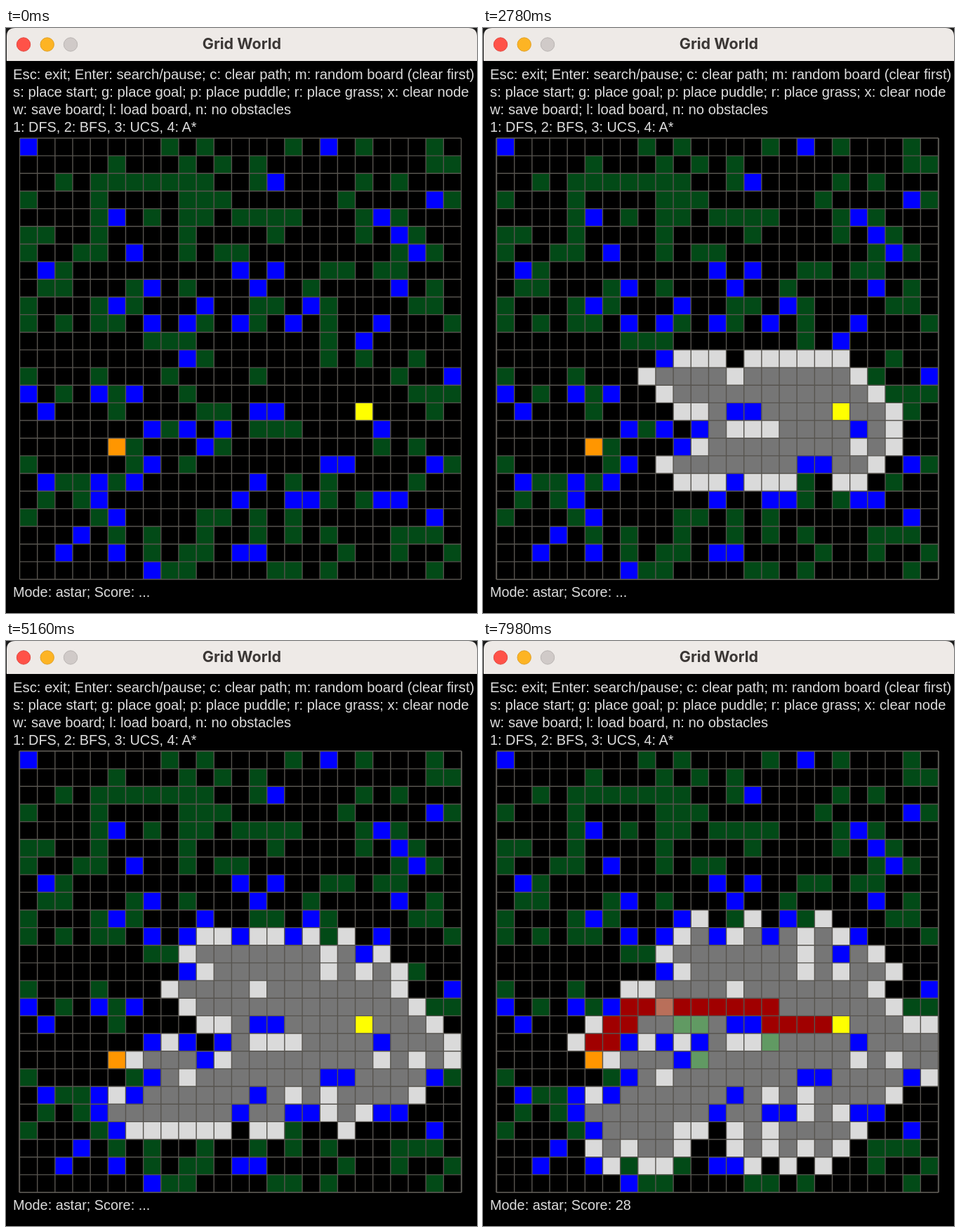
These frames come from a looping animation (671 by 834 pixels, 8000 ms). An HTML page with a canvas:

```html
<!DOCTYPE html>
<html lang="en">
<head>
<meta charset="utf-8">
<title>Grid World</title>
<style>
  html, body { margin: 0; width: 100%; height: 100%; overflow: hidden; background: #000; }
  svg, canvas { position: absolute; left: 0; top: 0; width: 671px; height: 834px; }
  .help { font: 20.25px "Liberation Sans", Arial, sans-serif; fill: #dcdcdc; }
  .status { font-size: 19.85px; }
  .title { font: 700 21.5px Inter, sans-serif; fill: #3b3735; }
</style>
</head>
<body>
<svg viewBox="0 0 671 834">
  <rect width="671" height="46" fill="#1a1a1a"/>
  <path d="M1 47V12Q1 0 13 0H659Q671 0 671 12V47Z" fill="#eeeae7"/>
  <circle cx="25" cy="23.5" r="9.7" fill="#ff5248" stroke="#e2463f"/>
  <circle cx="58.7" cy="23.5" r="9.7" fill="#fdb424" stroke="#e0a024"/>
  <circle cx="92" cy="23.5" r="9.7" fill="#d0cac8" stroke="#b9b4b2"/>
  <text class="title" x="336" y="30" text-anchor="middle">Grid World</text>
  <g class="help">
    <text x="10" y="72.5">Esc: exit; Enter: search/pause; c: clear path; m: random board (clear first)</text>
    <text x="10" y="97.5">s: place start; g: place goal; p: place puddle; r: place grass; x: clear node</text>
    <text x="10" y="122.5">w: save board; l: load board, n: no obstacles</text>
    <text class="status" x="10" y="147.5">1: DFS, 2: BFS, 3: UCS, 4: A*</text>
    <text class="status" id="status" x="10" y="810.5"></text>
  </g>
</svg>
<canvas id="board" width="671" height="834"></canvas>
<script>
// B = puddle (blocked), G = grass (costly), . = free
const MAP = `
B.......G.G....G.B.G...G.
.....G...G.G.G.........GG
..G.GGGGGGG..GB....G.G...
G...G....GGG......G....BG
....GB.G.GG.GGGG...GBG...
GG..G....G....G....G.BG..
G..GG.B..G.GG........GBG.
.BG.........B.B..GG.GG...
.GG...GB.G...B..G....B.G.
G...GBG...B..GG.BG....GG.
G.G.GG.B.BG.BG.B.G..B...G
.......GGG.......G.B.....
.........BG......G.G..G..
G...G...G....G.......G..B
B.G.BGB..G............GGG
.B...G....GG.BB........G.
.......BGB.B.GGG....B....
......G...BG........G.G..
G.....GB.G.......BB....BG
.BGGBGB......B.G.G....G..
.G.GB.......B..BBG.GBB...
G...GB....GG.G.G.......B.
...B.G.G..G..G.G.G...GGG.
..B..B.G.GG.BB....G..G..G
.......BGG....GG.G.....G.`.trim().split("\n").join("");

const N = 25, CELL = 25.16, LEFT = 19.5, TOP = 157, LOOP = 8000;
const START = 15 * N + 19, GOAL = 17 * N + 5;
const COLORS = {
  ".": "#000", B: "#0000ff", G: "#024a17", line: "#57544f",
  start: "#ffff00", goal: "#ff9600", open: "#dadada",
  closed: "#767676", closedGrass: "#619a63", path: "#a00000", pathGrass: "#b96f5a"
};

const row = id => Math.floor(id / N), col = id => id % N;
const cost = id => MAP[id] === "G" ? 10 : 1;
const heuristic = id => Math.abs(row(id) - row(GOAL)) + Math.abs(col(id) - col(GOAL));

function neighbours(id) {
  const list = [];
  if (row(id) > 0) list.push(id - N);
  if (row(id) < N - 1) list.push(id + N);
  if (col(id) > 0) list.push(id - 1);
  if (col(id) < N - 1) list.push(id + 1);
  return list.filter(n => MAP[n] !== "B");
}

// A* with ties broken by row, then column; notes the step each cell opens and closes.
function search() {
  const g = { [START]: 0 }, previous = {}, opened = {}, closed = {};
  const frontier = new Set([START]);
  const rank = id => (g[id] + heuristic(id)) * N * N + id;
  let step = 0;
  while (frontier.size && !(GOAL in previous)) {
    const current = [...frontier].reduce((a, b) => rank(b) < rank(a) ? b : a);
    frontier.delete(current);
    closed[current] = ++step;
    for (const next of neighbours(current)) {
      const total = g[current] + cost(next);
      if (next in closed || total >= (g[next] ?? Infinity)) continue;
      g[next] = total;
      previous[next] = current;
      opened[next] ??= step;
      frontier.add(next);
    }
  }
  const path = new Set();
  for (let id = GOAL; id !== undefined; id = previous[id]) path.add(id);
  const score = [...path].reduce((sum, id) => sum + cost(id), 0);
  return { opened, closed, path, score, steps: step };
}

const result = search();
const ctx = document.getElementById("board").getContext("2d");
const status = document.getElementById("status");

function cellColor(id, step) {
  const grass = MAP[id] === "G" ? "Grass" : "";
  if (id === START) return COLORS.start;
  if (id === GOAL) return COLORS.goal;
  if (step >= result.steps && result.path.has(id)) return COLORS["path" + grass];
  if (result.closed[id] <= step) return COLORS["closed" + grass];
  if (result.opened[id] <= step) return COLORS.open;
  return COLORS[MAP[id]];
}

function draw(step) {
  for (let id = 0; id < N * N; id++) {
    ctx.fillStyle = cellColor(id, step);
    ctx.fillRect(LEFT + col(id) * CELL, TOP + row(id) * CELL, CELL, CELL);
  }
  ctx.strokeStyle = COLORS.line;
  ctx.lineWidth = 1.4;
  ctx.beginPath();
  for (let i = 0; i <= N; i++) {
    const d = i * CELL, size = N * CELL;
    ctx.moveTo(LEFT + d, TOP);
    ctx.lineTo(LEFT + d, TOP + size);
    ctx.moveTo(LEFT, TOP + d);
    ctx.lineTo(LEFT + size, TOP + d);
  }
  ctx.stroke();
  status.textContent = "Mode: astar; Score: " + (step >= result.steps ? result.score : "...");
}

// The picture advances in a 20, 100, 20 ms rhythm.
function stepAt(ms) {
  const phase = ms % 140;
  const tick = 3 * Math.floor(ms / 140) + (phase >= 20) + (phase >= 120);
  return Math.max(0, Math.min(result.steps, Math.floor(tick * 0.98 - 4)));
}

const begin = performance.now();
let shown = -1;
function frame() {
  const step = stepAt((performance.now() - begin) % LOOP);
  if (step !== shown) draw(shown = step);
  requestAnimationFrame(frame);
}
frame();
</script>
</body>
</html>
```
